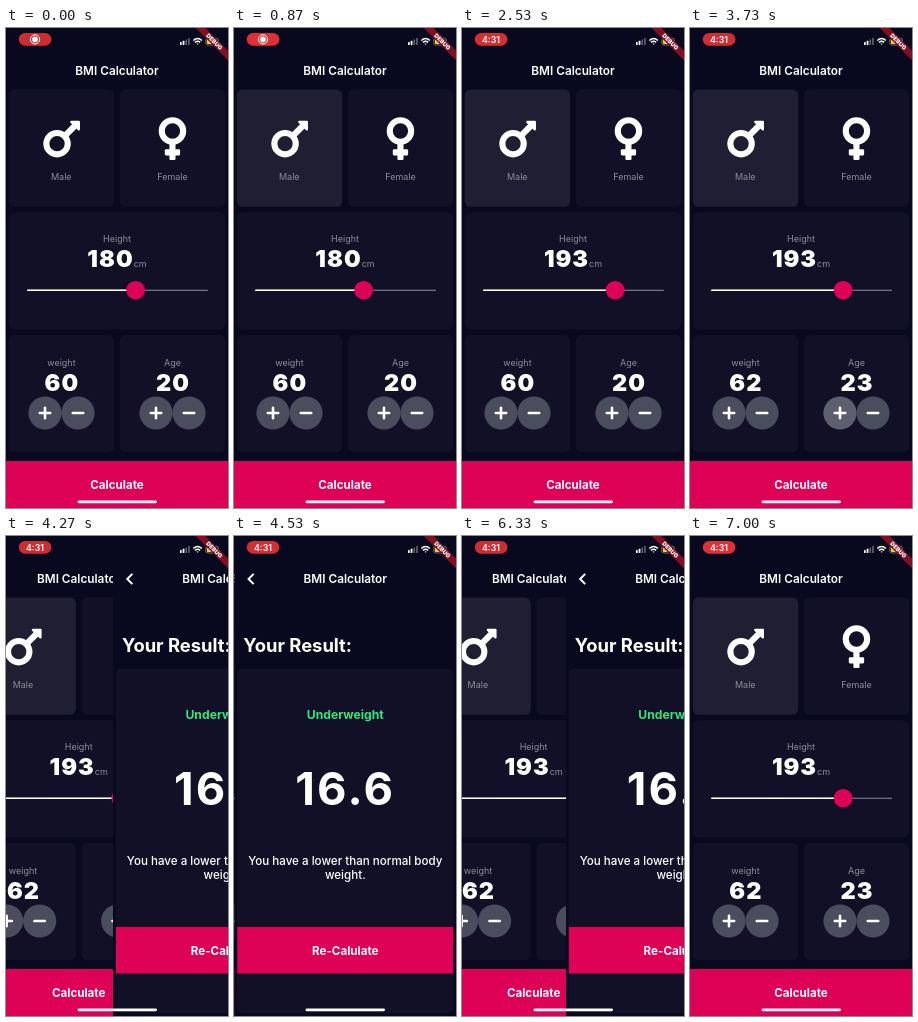
These frames come from a looping animation (222x480 px, 7190 ms). An HTML page:

```html
<!DOCTYPE html>
<html lang="en">
<head>
<meta charset="utf-8">
<title>BMI Calculator</title>
<style>
  html, body { margin: 0; width: 100%; height: 100%; overflow: hidden; background: #08091f; }
  svg { display: block; width: 100%; height: 100%; font-family: Inter, "Open Sans", sans-serif; }
  text { fill: #fff; text-anchor: middle; }
  .bg { fill: #08091f; }
  .card { fill: #111026; }
  .pink { fill: #dd0256; }
  .label { font-size: 9px; fill: #8d8e98; }
  .title { font-size: 11.8px; font-weight: 600; }
  .value { font-size: 23.5px; font-weight: 900; letter-spacing: 1px; }
  .unit { font-size: 9px; font-weight: 400; letter-spacing: 0; fill: #8d8e98; }
  .action { font-size: 11.6px; font-weight: 700; }
  .message { font-size: 11.6px; font-weight: 500; }
  .round { fill: #4a4d5d; }
  .sign { stroke: #fff; stroke-width: 2.6; stroke-linecap: round; }

  .home, .result, .press, .pill, .record, .clock { animation: 7190ms linear infinite; }
  .home { animation-name: home; }
  .result { animation-name: result; }
  .home, .result { --slide: cubic-bezier(.35, .91, .33, .97); }
  .pill { animation-name: pulse; }
  .record { animation-name: record; }
  .clock { animation-name: clock; }
  .press { fill: #fff; opacity: 0; }
  .press.weight { animation-name: press-weight; }
  .press.age { animation-name: press-age; }

  @keyframes home {
    0% { transform: translateX(0); }
    57.72% { transform: translateX(0); animation-timing-function: var(--slide); }
    63.28% { transform: translateX(-74px); }
    86.51% { transform: translateX(-74px); animation-timing-function: var(--slide); }
    92.07%, 100% { transform: translateX(0); }
  }
  @keyframes result {
    0% { transform: translateX(222px); }
    57.72% { transform: translateX(222px); animation-timing-function: var(--slide); }
    63.28% { transform: translateX(0); }
    86.51% { transform: translateX(0); animation-timing-function: var(--slide); }
    92.07%, 100% { transform: translateX(222px); }
  }
  @keyframes pulse {
    0%, 28.1%, 57%, 86.2% { fill: #cb2d32; animation-timing-function: ease-in-out; }
    13.6%, 42.6%, 71.4%, 100% { fill: #e23035; animation-timing-function: ease-in-out; }
  }
  @keyframes record { 0%, 28.5% { opacity: 1; } 31.5%, 100% { opacity: 0; } }
  @keyframes clock { 0%, 29.5% { opacity: 0; } 32.5%, 100% { opacity: 1; } }
  @keyframes press-weight {
    0%, 35.6% { opacity: 0; }
    37.3%, 41% { opacity: .1; }
    44%, 100% { opacity: 0; }
  }
  @keyframes press-age {
    0%, 43.8% { opacity: 0; }
    46%, 51.9% { opacity: .1; }
    55.5%, 100% { opacity: 0; }
  }
</style>
</head>
<body>
<svg viewBox="0 0 222 480">
  <defs>
    <g id="plus"><circle class="round" r="16.6"/><path class="sign" d="M-5.2 0H5.2M0-5.2V5.2"/></g>
    <g id="minus"><circle class="round" r="16.6"/><path class="sign" d="M-5.2 0H5.2"/></g>
  </defs>
  <rect class="bg" width="222" height="480"/>

  <g class="home">
    <rect class="bg" width="222" height="480"/>
    <text class="title" x="111" y="46.8">BMI Calculator</text>

    <rect id="male" class="card" x="2.8" y="61.6" width="105.4" height="117.2" rx="5.7"/>
    <rect class="card" x="113.8" y="61.6" width="105.4" height="117.2" rx="5.7"/>
    <rect class="card" x="2.8" y="184.3" width="216.4" height="117.2" rx="5.7"/>
    <rect class="card" x="2.8" y="307" width="105.4" height="117.2" rx="5.7"/>
    <rect class="card" x="113.8" y="307" width="105.4" height="117.2" rx="5.7"/>

    <g fill="none" stroke="#fff" stroke-width="64" transform="translate(37.3 86.6) scale(.0955)">
      <circle cx="144" cy="304" r="112"/>
      <path d="M226 222 326 122"/>
      <path d="M293 76H372V155Z" fill="#fff" stroke-width="24" stroke-linejoin="round"/>
    </g>
    <g fill="none" stroke="#fff" stroke-width="64" transform="translate(152.7 86.2) scale(.0955)">
      <circle cx="144" cy="176" r="112"/>
      <g fill="#fff" stroke="none">
        <rect x="112" y="300" width="64" height="180" rx="12"/>
        <rect x="64" y="368" width="160" height="64" rx="12"/>
      </g>
    </g>
    <text class="label" x="55.3" y="151.6">Male</text>
    <text class="label" x="166.5" y="151.6">Female</text>

    <text class="label" x="111" y="214.2">Height</text>
    <text class="value" x="111" y="239.4"><tspan id="height">180</tspan><tspan class="unit">cm</tspan></text>
    <rect x="21" y="261.7" width="181" height="1.1" rx=".5" fill="#8d8e98"/>
    <rect id="track" x="21" y="261.4" width="108" height="1.7" rx=".8" fill="#fff"/>
    <g id="thumb">
      <circle id="halo" class="pink" cy="262.2" r="0" opacity=".22"/>
      <circle class="pink" cy="262.2" r="9.3"/>
    </g>

    <text class="label" x="55.4" y="338">weight</text>
    <text class="value" x="55.9" y="362.6" id="weight">60</text>
    <use href="#plus" x="39" y="385"/>
    <circle class="press weight" cx="39" cy="385" r="16.6"/>
    <use href="#minus" x="72" y="385"/>

    <text class="label" x="166.5" y="338">Age</text>
    <text class="value" x="167" y="362.6" id="age">20</text>
    <use href="#plus" x="150" y="385"/>
    <circle class="press age" cx="150" cy="385" r="16.6"/>
    <use href="#minus" x="183" y="385"/>

    <rect class="pink" y="433" width="222" height="47"/>
    <text class="action" x="111" y="461">Calculate</text>
  </g>

  <g class="result">
    <rect class="bg" width="222" height="480"/>
    <path d="M19.4 37.9 14.3 43 19.4 48.1" fill="none" stroke="#fff" stroke-width="2"/>
    <text class="title" x="111" y="46.8">BMI Calculator</text>
    <text x="9" y="116.4" font-size="18.4" font-weight="700" style="text-anchor: start">Your Result:</text>
    <rect class="card" x="2.8" y="132.5" width="216.4" height="344.5" rx="5.7"/>
    <text x="111" y="182.8" font-size="12.2" font-weight="700" style="fill: #33e67a">Underweight</text>
    <text x="111" y="268.6" font-size="45.5" font-weight="700" letter-spacing="2.2">16.6</text>
    <text class="message" x="111" y="328.9">You have a lower than normal body</text>
    <text class="message" x="111" y="343">weight.</text>
    <rect class="pink" x="3" y="391" width="216" height="46.5"/>
    <text class="action" x="111" y="418.8">Re-Calulate</text>
  </g>

  <rect class="pill" x="12.8" y="4.9" width="32.6" height="12.8" rx="6.4"/>
  <g class="record">
    <circle cx="29" cy="11.4" r="4.6" fill="none" stroke="#fff"/>
    <circle cx="29" cy="11.4" r="2.8" fill="#fff"/>
  </g>
  <text class="clock" x="29" y="14.6" font-size="8.8" font-weight="600">4:31</text>

  <g fill="#fff">
    <rect x="174" y="14" width="1.7" height="3" rx=".5"/>
    <rect x="176.7" y="12.8" width="1.7" height="4.2" rx=".5"/>
    <rect x="179.4" y="11.4" width="1.7" height="5.6" rx=".5" opacity=".35"/>
    <rect x="182.1" y="10" width="1.7" height="7" rx=".5" opacity=".35"/>
  </g>
  <g fill="none" stroke="#fff" stroke-width="1.4">
    <path d="M187.3 12.4Q191.6 8.6 195.9 12.4M189 14.4Q191.6 12.2 194.2 14.4"/>
    <path d="M190.4 15.4 191.6 16.8 192.8 15.4Z" fill="#fff" stroke="none"/>
  </g>
  <rect x="199.8" y="10.2" width="12.6" height="6.8" rx="2" fill="none" stroke="#8d8e98" stroke-width=".8"/>
  <rect x="200.9" y="11.3" width="6.5" height="4.6" rx="1" fill="#f4cf2d"/>
  <g transform="translate(222 0) rotate(45)">
    <rect x="-23" y="15.9" width="46" height="6.9" fill="#860c20"/>
    <text y="21.4" font-size="5.8" font-weight="900">DEBUG</text>
  </g>
  <rect x="71.5" y="472.4" width="79.5" height="2.9" rx="1.45" fill="#fff"/>
</svg>

<script>
  const LOOP = 7190;
  const MIN_HEIGHT = 120, TRACK_X = 21, TRACK_SCALE = 1.81;
  const get = id => document.getElementById(id);
  const [male, height, track, thumb, halo, weight, age] =
    ['male', 'height', 'track', 'thumb', 'halo', 'weight', 'age'].map(get);

  // Each point is [time, value]; values between points are linear.
  const drag = [[1470, 180], [1530, 182], [1600, 187], [1850, 220], [1930, 220], [2130, 193]];
  const haloRadius = [[1500, 0], [1620, 18], [2150, 18], [2270, 0]];

  function along(points, t) {
    const next = points.findIndex(p => p[0] > t);
    if (next === 0) return points[0][1];
    if (next < 0) return points[points.length - 1][1];
    const [t0, a] = points[next - 1], [t1, b] = points[next];
    return a + (b - a) * (t - t0) / (t1 - t0);
  }

  const count = (start, taps, t) => start + taps.filter(tap => t >= tap).length;

  function draw(t) {
    const h = Math.round(along(drag, t));
    const x = (h - MIN_HEIGHT) * TRACK_SCALE;
    male.style.fill = t >= 600 ? '#1f1e33' : '';
    height.textContent = h;
    track.setAttribute('width', x);
    thumb.setAttribute('transform', `translate(${TRACK_X + x} 0)`);
    halo.setAttribute('r', along(haloRadius, t));
    weight.textContent = count(60, [2680, 2900], t);
    age.textContent = count(20, [3270, 3450, 3650], t);
  }

  let start;
  function frame(now) {
    start ??= now;
    draw((now - start) % LOOP);
    requestAnimationFrame(frame);
  }
  draw(0);
  requestAnimationFrame(frame);
</script>
</body>
</html>
```
